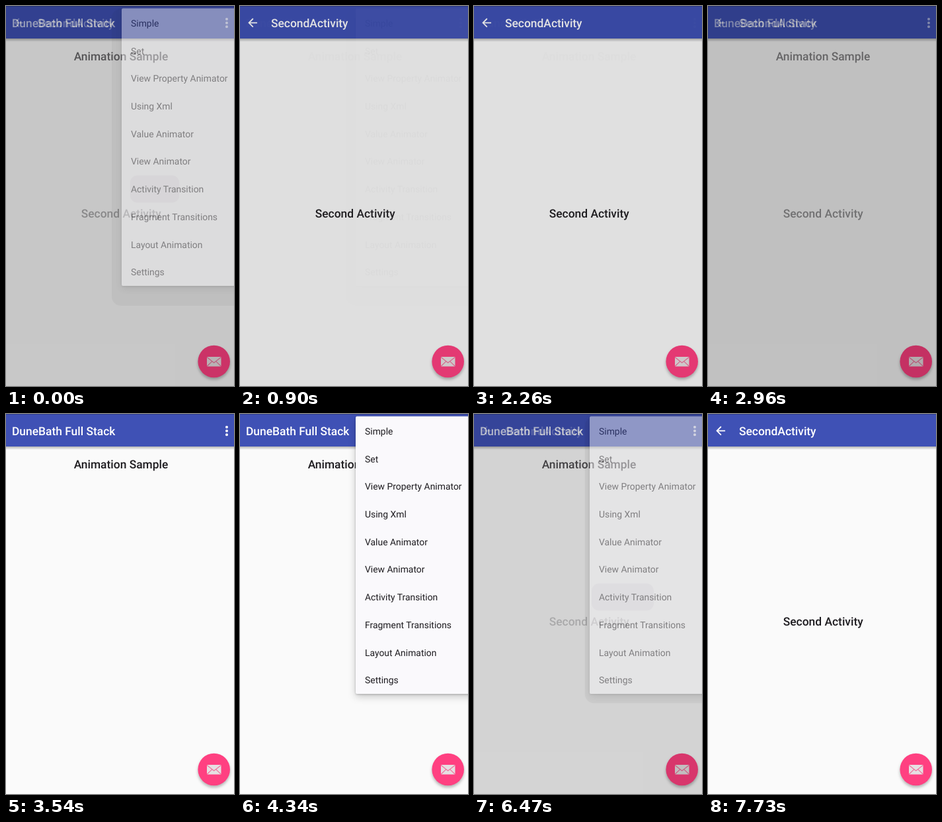
Write an HTML page that moves like this. It is 345 by 573 pixels and loops after 8 s.

```html
<!DOCTYPE html>
<html lang="en">
<head>
<meta charset="utf-8">
<title>Activity transition</title>
<style>
  html, body { margin: 0; width: 100%; height: 100%; overflow: hidden; background: #000; }
  svg { display: block; width: 345px; height: 573px; }
  text { font: 500 17.4px Roboto, sans-serif; fill: #1e1c20; text-rendering: geometricPrecision; }
  .bar { fill: #fff; }
  .mid { text-anchor: middle; }
  #menu text { font-weight: 400; font-size: 13.92px; }
  #panel { filter: drop-shadow(0 1px 1.5px rgba(0, 0, 0, .22)) drop-shadow(0 4px 6px rgba(0, 0, 0, .2)); }
  .fab { filter: drop-shadow(0 3px 2.3px rgba(0, 0, 0, .28)); }
</style>
</head>
<body>
<svg viewBox="0 0 345 573">
  <defs>
    <linearGradient id="shade" x2="0" y2="1">
      <stop stop-opacity=".28"/>
      <stop offset="1" stop-opacity="0"/>
    </linearGradient>
    <clipPath id="outside"><path d="M0 4H175V422H345V573H0z"/></clipPath>
    <g id="base">
      <rect width="345" height="573" fill="#fafafa"/>
      <rect y="49" width="345" height="5" fill="url(#shade)"/>
      <rect width="345" height="49" fill="#3f51b5"/>
      <rect width="345" height="1" fill="#303f8f"/>
      <circle class="fab" cx="314.7" cy="536" r="24.3" fill="#ff4081"/>
      <rect x="304" y="529" width="21.5" height="14.5" rx="1" fill="#e6e0e2"/>
      <path d="M304 529.5l10.7 8.5 10.8-8.5M304.3 543l7.5-7.2M325.2 543l-7.5-7.2" fill="none" stroke="#f0719b" stroke-width="1.1"/>
    </g>
  </defs>

  <g id="first">
    <use href="#base"/>
    <text class="bar" x="9" y="32">DuneBath Full Stack</text>
    <g fill="#fff">
      <circle cx="334" cy="19.7" r="2"/>
      <circle cx="334" cy="25.5" r="2"/>
      <circle cx="334" cy="31.3" r="2"/>
    </g>
    <text class="mid" x="174" y="82">Animation Sample</text>
  </g>

  <g id="second">
    <use href="#base"/>
    <path d="M26 25.3H14M19.8 19l-6.3 6.3 6.3 6.3" fill="none" stroke="#fff" stroke-width="1.8"/>
    <text class="bar" x="47" y="32">SecondActivity</text>
    <text class="mid" x="174.2" y="319">Second Activity</text>
  </g>

  <g clip-path="url(#outside)">
    <rect id="slab" y="4" width="200" rx="14"/>
  </g>
  <g id="menu">
    <rect id="panel" x="175" y="3.6" width="185" height="418.4" rx="2" fill="#faf9fc"/>
    <rect id="ripple" y="255.5" height="41" rx="11" fill="#2a0a3c"/>
  </g>
</svg>
<script>
const $ = id => document.getElementById(id);
const set = (id, attrs) => {
  for (const k in attrs) $(id).setAttribute(k, attrs[k]);
};
const clamp = (v, lo, hi) => Math.min(hi, Math.max(lo, v));
const ramp = (t, from, to) => clamp((t - from) / (to - from), 0, 1);

['Simple', 'Set', 'View Property Animator', 'Using Xml', 'Value Animator', 'View Animator',
 'Activity Transition', 'Fragment Transitions', 'Layout Animation', 'Settings'].forEach((label, i) => {
  const item = document.createElementNS('http://www.w3.org/2000/svg', 'text');
  item.textContent = label;
  item.setAttribute('x', 189);
  item.setAttribute('y', 30.8 + i * 41.72);
  $('menu').append(item);
});

// spans during which the picture stalls
const stalls = [[1020, 1450], [2260, 2530], [2530, 2960], [2960, 3540], [6470, 7430], [7430, 7730]];

function draw(now) {
  const time = now % 8000;
  const stall = stalls.find(([from, to]) => time >= from && time < to);
  const t = stall ? stall[0] : time;

  // opacity of the second screen: opens, goes back, opens again
  const mix = clamp(.28 + .72 * ramp(t, 0, 1050) ** 1.2 - ramp(t, 2100, 3440)
    + .19 * ramp(t, 5950, 6470) + .81 * ramp(t, 6470, 7480), 0, 1);
  const menu = clamp(.42 - .42 * ramp(t, 0, 950) + ramp(t, 3700, 4050)
    - .54 * ramp(t, 5850, 6470) - .46 * ramp(t, 6470, 7430), 0, 1);
  const grow = clamp(mix * 88 - 9.6, 0, 15);
  const half = clamp(68 - mix * 110, 0, 47);
  const pressed = t < 950 || t >= 5790;

  set('first', { opacity: 1 - mix });
  set('second', { opacity: mix });
  set('menu', { opacity: menu });
  set('slab', { x: 175 - grow, height: 418 + grow * 2, opacity: Math.min(.04, menu / 10) });
  set('ripple', { x: 225 - half, width: half * 2, opacity: pressed ? .06 : 0 });
  requestAnimationFrame(draw);
}
requestAnimationFrame(draw);
</script>
</body>
</html>
```
